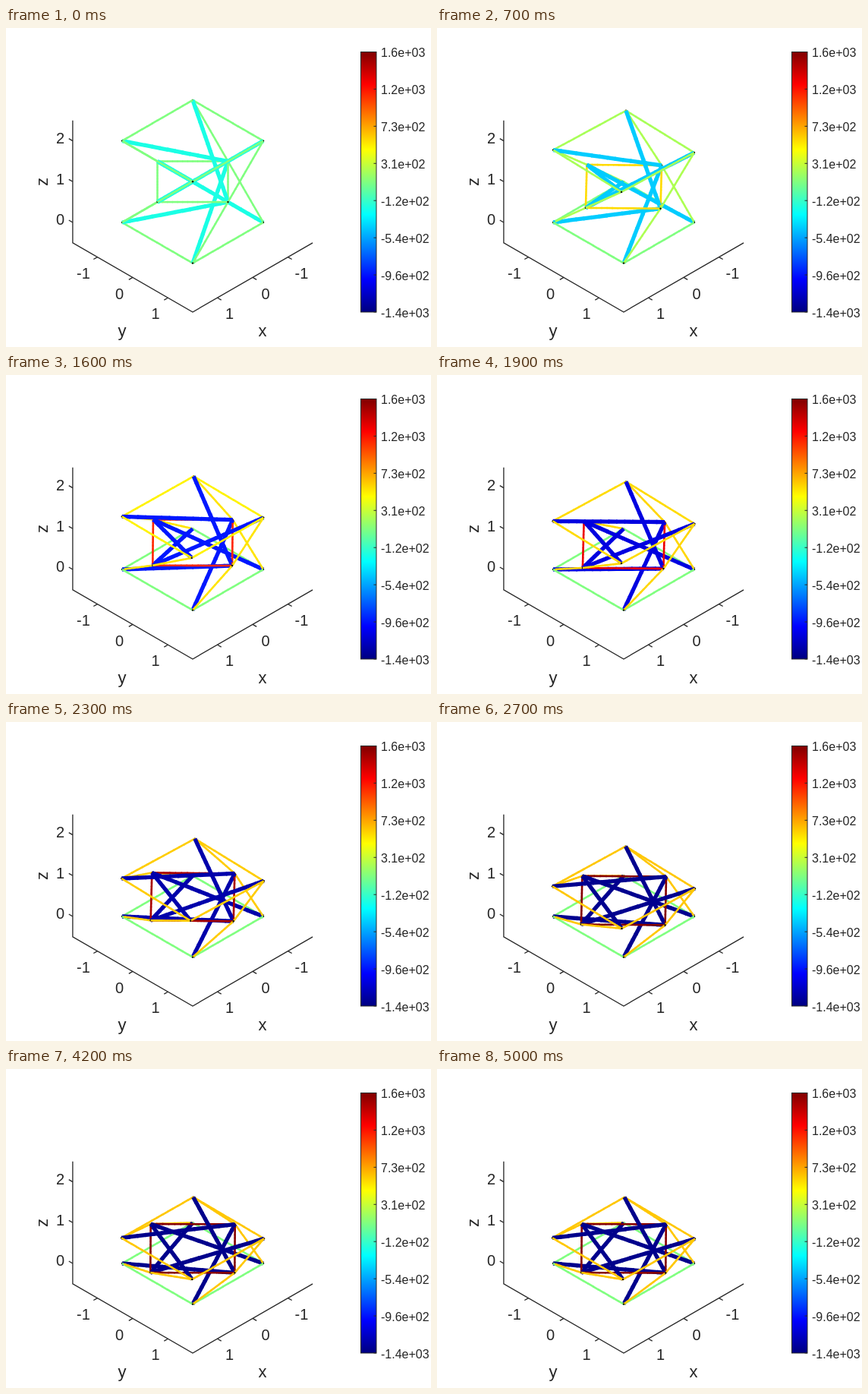
Write an HTML page that moves like this. It is 560 px wide and 420 px high and loops after 5100 ms.

```html
<!DOCTYPE html>
<html lang="en">
<head>
<meta charset="utf-8">
<title>Folding tensegrity module</title>
<style>
  html, body { margin: 0; width: 100%; height: 100%; overflow: hidden; background: #fff; }
  svg { display: block; width: 560px; height: 420px; font-family: "Liberation Sans", Arial, sans-serif; }
</style>
</head>
<body>
<svg id="stage" viewBox="0 0 560 420">
  <defs><linearGradient id="jet" x1="0" y1="1" x2="0" y2="0"></linearGradient></defs>
  <g id="axes" stroke="#262626" stroke-width="1.3" fill="none"></g>
  <g id="labels" fill="#262626"></g>
  <g id="truss"></g>
</svg>
<script>
const LOOP = 5100, STEP = 100, PIECES = 14;
const byId = id => document.getElementById(id);

function add(parent, tag, attrs, text) {
  const el = document.createElementNS("http://www.w3.org/2000/svg", tag);
  set(el, attrs);
  if (text !== undefined) el.textContent = text;
  parent.appendChild(el);
  return el;
}
function set(el, attrs) {
  for (const k in attrs) el.setAttribute(k, attrs[k]);
}

// Isometric view; depth grows toward the viewer.
const project = ([x, y, z]) => [246 + 46.5 * (y - x), 256 + 26.8 * (x + y) - 53.7 * z];
const depth = ([x, y, z]) => x + y + z;
const mix = (a, b, t) => a.map((v, i) => v + (b[i] - v) * t);

function jet(v) {
  const ch = c => Math.round(255 * Math.max(0, Math.min(1, 1.5 - Math.abs(4 * v - c))));
  return `rgb(${ch(3)},${ch(2)},${ch(1)})`;
}

// Monotone cubic through the key values.
const TIMES = [0, 700, 1200, 1900, 2700, 3500, 5000];
function curve(...ys) {
  const n = ys.length;
  const h = i => TIMES[i + 1] - TIMES[i];
  const d = i => (ys[i + 1] - ys[i]) / h(i);
  const m = ys.map((_, i) => {
    if (i === 0) return ((2 * h(0) + h(1)) * d(0) - h(0) * d(1)) / (h(0) + h(1));
    if (i === n - 1 || d(i - 1) * d(i) <= 0) return 0;
    const a = 2 * h(i) + h(i - 1), b = h(i) + 2 * h(i - 1);
    return (a + b) / (a / d(i - 1) + b / d(i));
  });
  return t => {
    let i = 0;
    while (i < n - 2 && t > TIMES[i + 1]) i++;
    const w = h(i), u = (t - TIMES[i]) / w, q = 1 - u;
    return ys[i] * (1 + 2 * u) * q * q + m[i] * w * u * q * q
      + ys[i + 1] * u * u * (3 - 2 * u) - m[i + 1] * w * u * u * q;
  };
}

const topZ = curve(2, 1.744, 1.458, 1.151, 0.711, 0.624, 0.615);
const topR = curve(1, 1, 1, 1.005, 1.01, 1.01, 1.01);
const midZ = curve(1, 0.878, 0.735, 0.6, 0.39, 0.37, 0.367);
const midR = curve(1, 1.06, 1.1, 1.145, 1.19, 1.194, 1.194);
const twist = curve(0, -0.032, 0.016, -0.032, -0.027, -0.006, -0.01);
const force = {
  bar: curve(0.4, 0.325, 0.23, 0.095, 0.015, 0.012, 0.012),
  ring: curve(0.5, 0.66, 0.75, 0.895, 0.995, 0.995, 0.995),
  top: curve(0.5, 0.54, 0.592, 0.66, 0.68, 0.68, 0.68),
  side: curve(0.5, 0.545, 0.622, 0.665, 0.68, 0.68, 0.68),
  base: () => 0.5
};

// Nodes 0-3 base, 4-7 top, 8-11 middle, each ring in quarter turns.
const members = [];
for (let i = 0; i < 4; i++) {
  const j = (i + 1) % 4;
  members.push(
    ["bar", i, 8 + (i + 2) % 4], ["bar", 4 + i, 8 + (i + 3) % 4],
    ["base", i, j], ["top", 4 + i, 4 + j], ["ring", 8 + i, 8 + j],
    ["side", i, 8 + j], ["side", 4 + i, 8 + i]
  );
}

function ring(x, y, r, z, turn) {
  return [0, 1, 2, 3].map(i => {
    const a = turn + i * Math.PI / 2, c = Math.cos(a) * r, s = Math.sin(a) * r;
    return [x * c - y * s, x * s + y * c, z];
  });
}

const truss = byId("truss");
const pool = members.flatMap(() => Array.from({ length: PIECES }, () => add(truss, "line", {})));
const dots = Array.from({ length: 12 }, () => add(truss, "circle", { r: 1.2, fill: "#000" }));

function draw(t) {
  const turn = twist(t);
  const nodes = [
    ...ring(1, 1, 1, 0, 0),
    ...ring(1, 1, topR(t), topZ(t), turn),
    ...ring(1, 0, midR(t), midZ(t), turn / 2)
  ];
  const items = [];
  members.forEach(([kind, a, b], k) => {
    const p = nodes[a], q = nodes[b], stroke = jet(force[kind](t));
    for (let i = 0; i < PIECES; i++) {
      const el = pool[k * PIECES + i];
      const [x1, y1] = project(mix(p, q, Math.max(0, (i - 0.08) / PIECES)));
      const [x2, y2] = project(mix(p, q, Math.min(1, (i + 1.08) / PIECES)));
      set(el, { x1, y1, x2, y2, stroke, "stroke-width": kind === "bar" ? 5.3 : 2.6 });
      items.push([depth(mix(p, q, (i + 0.5) / PIECES)), el]);
    }
  });
  nodes.forEach((p, i) => {
    const [cx, cy] = project(p);
    set(dots[i], { cx, cy });
    items.push([depth(p) + 0.03, dots[i]]);
  });
  items.sort((a, b) => a[0] - b[0]);
  truss.append(...items.map(it => it[1]));
}

function drawAxes() {
  const axes = byId("axes"), labels = byId("labels"), L = 1.7, Z = -0.5;
  const path = pts => "M" + pts.map(p => project(p).join(" ")).join("L");
  const label = (x, y, size, text, anchor = "middle") =>
    add(labels, "text", { x, y, "font-size": size, "text-anchor": anchor }, text);
  add(axes, "path", { d: path([[L, -L, 2.5], [L, -L, Z], [L, L, Z], [-L, L, Z]]) });
  const e = 0.11;
  for (const v of [-1, 0, 1]) {
    add(axes, "path", { d: path([[L, v, Z], [L + e, v, Z]]) });
    add(axes, "path", { d: path([[v, L, Z], [v, L + e, Z]]) });
    add(axes, "path", { d: path([[L, -L, v + 1], [L, -L - e, v + 1]]) });
    label(149.5 + v * 47.5, 356.5 + v * 26.5, 20, v);
    label(342 - v * 47.5, 356.5 + v * 26.5, 20, v);
    label(77, 205.5 - v * 53.5, 20, v + 1, "end");
  }
  label(153, 406, 22, "y");
  label(338, 406, 22, "x");
  add(labels, "text", { transform: "translate(55 202.5) rotate(-90)", "font-size": 22, "text-anchor": "middle" }, "z");

  for (let i = 0; i <= 64; i++) add(byId("jet"), "stop", { offset: i / 64, "stop-color": jet(i / 64) });
  add(axes, "rect", { x: 467.5, y: 31.5, width: 20.5, height: 342.5, fill: "url(#jet)", "stroke-width": 1 });
  ["1.6e+03", "1.2e+03", "7.3e+02", "3.1e+02", "-1.2e+02", "-5.4e+02", "-9.6e+02", "-1.4e+03"].forEach((s, i) => {
    const y = 31.5 + i * 342.5 / 7;
    add(axes, "path", { d: `M488 ${y}h-3.5`, "stroke-width": 1 });
    label(494, y + 6.7, 16, s, "start");
  });
}

let shown = -1;
const start = performance.now();
function tick() {
  const t = Math.floor((performance.now() - start) % LOOP / STEP) * STEP;
  if (t !== shown) draw(shown = t);
  requestAnimationFrame(tick);
}
drawAxes();
tick();
</script>
</body>
</html>
```
